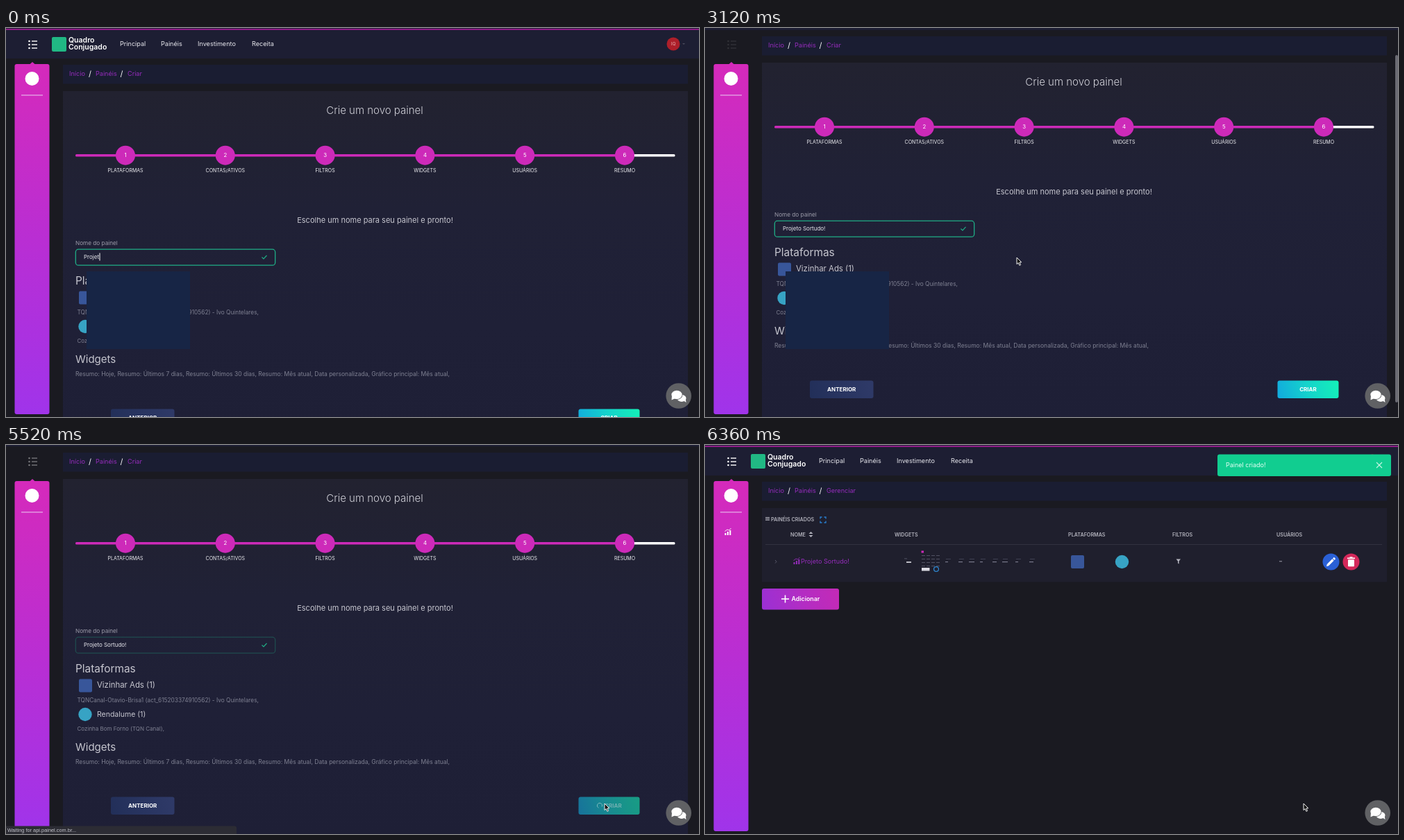
Recreate the animation shown at these times as an HTML page with a canvas. Size 998 by 561 pixels, loop 6400 ms.

```html
<!DOCTYPE html>
<html lang="pt">
<head>
<meta charset="utf-8">
<style>
html, body { margin: 0; width: 100%; height: 100%; overflow: hidden; background: #1a1a21 }
canvas { display: block }
</style>
</head>
<body>
<canvas id="stage" width="998" height="561"></canvas>
<script>
const g = document.getElementById('stage').getContext('2d');
const LOOP = 6400;
const PINK = '#cd2ab9', PURPLE = '#962cbc', PALE = '#c6c6cf', GREY = '#7f8092';
const NAME = 'Projeto Sortudo!';

const clamp = v => Math.max(0, Math.min(1, v));
const ramp = (t, a, b) => clamp((t - a) / (b - a));
const mix = (a, b, k) => a + (b - a) * k;
const smooth = k => k * k * (3 - 2 * k);

function text(s, x, y, size, color = '#fff', weight = 400, align = 'left', family = 'Inter, sans-serif') {
  g.font = `${weight} ${size}px ${family}`;
  g.textAlign = align;
  g.fillStyle = color;
  g.fillText(s, x, y + size * .35);
}

function box(x, y, w, h, color, r = 0) {
  g.beginPath();
  g.roundRect(x, y, w, h, r);
  g.fillStyle = color;
  g.fill();
}

function disc(x, y, r, color) {
  g.beginPath();
  g.arc(x, y, r, 0, 7);
  g.fillStyle = color;
  g.fill();
}

// points: x0, y0, x1, y1, ...
function trace(points) {
  g.beginPath();
  for (let i = 0; i < points.length; i += 2) g.lineTo(points[i], points[i + 1]);
}

function line(points, color, width = 1) {
  trace(points);
  g.strokeStyle = color;
  g.lineWidth = width;
  g.stroke();
}

function shape(points, color) {
  trace(points);
  g.closePath();
  g.fillStyle = color;
  g.fill();
}

function blend(x0, y0, x1, y1, ...colors) {
  const b = g.createLinearGradient(x0, y0, x1, y1);
  colors.forEach((c, i) => b.addColorStop(i / (colors.length - 1), c));
  return b;
}

function faded(alpha, draw) {
  if (alpha <= 0) return;
  g.save();
  g.globalAlpha *= alpha;
  draw();
  g.restore();
}

function chart(x, y, color) {
  [3, 5, 7].forEach((h, i) => box(x + i * 3.4, y - h, 2, h, color));
  line([x, y - 5.5, x + 3.5, y - 8, x + 6, y - 7, x + 9, y - 10], color, .9);
}

function header() {
  box(0, 0, 998, 44, '#1d1e33');
  box(0, 1, 998, 2, '#8f1c86');
  box(66, 13, 21, 21, '#21b884', 2);
  text('Quadro', 90, 17, 10.5, '#fff', 600);
  text('Conjugado', 90, 27, 10.5, '#fff', 600);
  [['Principal', 164], ['Painéis', 223], ['Investimento', 276], ['Receita', 354]]
    .forEach(([s, x]) => text(s, x, 23, 9.1, '#e8e8ee'));
  disc(961, 23, 9.5, '#ad1f2a');
  text('IQ', 961, 23, 6.5, '#e5a8aa', 400, 'center');
  shape([974, 22, 978, 22, 976, 24], '#4a4a5c');
}

function menuIcon() {
  for (let y = 19; y < 30; y += 5) {
    disc(33.5, y, 1.3, '#fff');
    box(37, y - .7, 8, 1.4, '#fff');
  }
}

function breadcrumbs(last) {
  box(82, 53, 900, 27.5, '#1a1d32');
  text('Início', 91, 66, 9.1, PURPLE);
  text('/', 119, 66, 11);
  text('Painéis', 129, 66, 9.1, PURPLE);
  text('/', 164.5, 66, 11);
  text(last, 175, 66, 9.1, PURPLE);
}

function sidebar(withChart) {
  shape([33.5, 53, 38, 49, 42.5, 53], '#d22abb');
  box(12.5, 52, 50, 505, blend(0, 52, 0, 557, '#d52abb', '#b92ed3', '#a034ea'), 3);
  disc(37.5, 73, 10, '#fff');
  box(22, 96.3, 31, 1.2, '#e6b3ea');
  if (withChart) chart(28.5, 130, '#fff');
}

function steps() {
  box(100, 182, 791, 3.6, PINK, 1.5);
  box(891, 182, 72.5, 3.6, '#fff', 1.5);
  ['PLATAFORMAS', 'CONTAS/ATIVOS', 'FILTROS', 'WIDGETS', 'USUÁRIOS', 'RESUMO'].forEach((s, i) => {
    const x = 172 + i * 143.8;
    disc(x, 183.7, 14, PINK);
    text(i + 1, x, 183.7, 7.8, '#fff', 400, 'center');
    text(s, x, 206, 7, '#f0f0f4', 400, 'center');
  });
}

function nameField(t) {
  text('Nome do painel', 100, 310, 8.2, '#9c9caa');
  faded(mix(1, .3, ramp(t, 4480, 4840)), () => {
    g.beginPath();
    g.roundRect(100.3, 319.2, 287.4, 23, 4);
    g.strokeStyle = '#1fae86';
    g.lineWidth = 1.3;
    g.stroke();
  });
  const count = t < 400 ? 6 : t < 1200 ? 7 : Math.min(16, 8 + Math.floor((t - 1200) / 80));
  const typed = NAME.slice(0, count);
  text(typed, 112, 330, 8, '#e8e8ee');
  const caret = t < 840 || (t >= 1200 && t < 2160) || (t >= 2520 && t < 2720);
  if (caret) box(112.5 + g.measureText(typed).width, 324.5, 1, 11, '#fff');
  line([368.5, 330.5, 371, 333, 375.5, 328], '#1fae86', 1.2);
}

function createButton(t) {
  const busy = t >= 4360;
  faded(busy ? .6 : 1, () => {
    box(824.5, 549.5, 88, 25.5, blend(824, 575, 912, 550, '#12a9de', '#14d3cb', '#14f0b8'), 3);
    text('CRIAR', busy ? 874.5 : 868.5, 562, 8, busy ? '#a8c4c8' : '#fff', 700, 'center');
    if (!busy) return;
    const a = t / 120;
    g.beginPath();
    g.arc(855, 562, 3.6, a, a + 4.7);
    g.strokeStyle = '#c4dcdc';
    g.lineWidth = 1;
    g.stroke();
  });
}

function formPage(t) {
  const scroll = t < 3000 ? 0 : 42 * (1 - Math.exp((2970 - t) / 40));
  g.save();
  g.translate(0, -scroll);
  box(82, 91, 900, 512, blend(0, 91, 0, 603, '#222230', '#202136', '#1f2037', '#1e1f36'));
  breadcrumbs('Criar');
  text('Crie um novo painel', 531, 119, 15, '#d0d0d8', 300, 'center');
  steps();
  text('Escolhe um nome para seu painel e pronto!', 531.5, 277, 11, PALE, 400, 'center');
  nameField(t);
  text('Plataformas', 100, 365, 15.4, PALE);
  box(105, 379.5, 19, 19, '#38569a', 2);
  text('Vizinhar Ads (1)', 131, 388, 11.4, PALE);
  text('TQNCanal-Otavio-Brisa1 (act_615203374910562) - Ivo Quintelares,', 102.5, 410, 8.3, GREY);
  disc(114, 430.5, 9.7, '#37a3c4');
  text('Rendalume (1)', 131, 430, 10.5, PALE);
  text('Cozinha Bom Forno (TQN Canal),', 102.5, 451, 8, GREY);
  text('Widgets', 100, 478, 15, PALE);
  text('Resumo: Hoje, Resumo: Últimos 7 dias, Resumo: Últimos 30 dias, Resumo: Mês atual, ' +
    'Data personalizada, Gráfico principal: Mês atual,', 100, 499, 8.5, GREY);
  box(151, 549.5, 91.5, 25.5, blend(151, 575, 242, 550, '#222f59', '#2f3a68'), 3);
  text('ANTERIOR', 196.7, 562, 8, '#fff', 700, 'center');
  createButton(t);
  header();
  g.restore();

  faded(1 - ramp(t, 5040, 5440), () => box(116, 351, 149, 112, '#172545'));
  faded(t < 3000 ? 1 : t < 3120 ? mix(1, .1, ramp(t, 3000, 3120)) : mix(.1, .4, ramp(t, 3120, 3500)), menuIcon);
  sidebar(false);
  if (t >= 3000) faded(1 - ramp(t, 3360, 3640), () => box(994, scroll * .95, 4, 501, '#6b6b73', 2));
}

function thumbnail() {
  box(311.5, 152.5, 3.5, 3, PINK);
  for (let y = 159; y < 175; y += 5) {
    for (let x = 312; x < 337; x += 7) box(x, y, 5, .8, '#5d5e70');
  }
  box(312, 177, 11.5, 4.5, '#dcdce4');
  g.beginPath();
  g.arc(333, 179, 3.4, 0, 7);
  g.strokeStyle = '#2f86cf';
  g.lineWidth = 1.3;
  g.stroke();
  box(290, 168.2, 7, 1.6, '#e4e4ea');
  box(287, 163.5, 4, .8, '#5d5e70');
  [346, 365, 380, 396, 414, 428, 447, 467].forEach((x, i) => {
    box(x, 168, 4 + i % 3 * 2, 1.2, '#77788a');
    box(x + 1, 164.3, 7, .7, '#4d4e60');
  });
}

function listCard() {
  const head = '#b2b2bc';
  box(82, 91, 900, 106.5, '#1f1f2d');
  for (let y = 104; y < 109; y += 1.9) box(87, y, 6, 1, head);
  text('PAINÉIS CRIADOS', 95, 107, 7.2, head, 600);
  for (const sx of [-1, 1]) for (const sy of [-1, 1]) {
    line([170 + sx * 4, 108 + sy * 1.5, 170 + sx * 4, 108 + sy * 4, 170 + sx * 1.5, 108 + sy * 4], '#2a7fd0', 1.3);
  }
  [['NOME', 123], ['WIDGETS', 273], ['PLATAFORMAS', 523], ['FILTROS', 673], ['USUÁRIOS', 823]]
    .forEach(([s, x]) => text(s, x, 129, 7.2, head, 600));
  shape([149.5, 128, 155.5, 128, 152.5, 125], head);
  shape([149.5, 130, 155.5, 130, 152.5, 133], head);
  box(87, 143, 888, 1, '#32323f');

  line([101, 166, 103, 168.3, 101, 170.5], '#5a5a6c');
  chart(127.5, 172, PURPLE);
  text(NAME, 138, 168, 9.1, PURPLE);
  thumbnail();
  box(527, 159, 19, 19, '#38569a', 2);
  disc(600.5, 168.5, 9.7, '#37a3c4');
  shape([678.5, 164.5, 685, 164.5, 682.5, 167.5, 682.5, 171.5, 681, 170.5, 681, 167.5], '#b8b8c2');
  box(827, 167.3, 4, 1, '#a0a0ac');

  disc(901.5, 168.5, 12, '#2a60d6');
  line([897.5, 172.5, 904.5, 165.5], '#fff', 3.2);
  line([905.2, 164.8, 907, 163], '#fff', 3.2);
  shape([895, 175, 896, 171, 899, 174], '#fff');
  disc(930.5, 168.5, 12, '#d4285a');
  box(925, 162.5, 11, 1.7, '#fff');
  box(928.5, 161.3, 4, 1.5, '#fff');
  box(926, 165.2, 9, 10, '#fff', 1);

  box(82, 207, 111, 30.5, blend(82, 237, 193, 207, '#9a30d4', '#b22dc4', '#c42ab6'), 3);
  line([110, 222, 121, 222], '#fff', 1.6);
  line([115.5, 216.5, 115.5, 227.5], '#fff', 1.6);
  text('Adicionar', 124.5, 222, 8.8, '#fff', 600);
}

function toast() {
  box(738, 13.5, 250, 31.5, '#11cd90', 3);
  text('Painel criado!', 750, 29, 9, '#e6fff5');
  line([967, 25, 975, 33], '#c8f5e4', 1.1);
  line([975, 25, 967, 33], '#c8f5e4', 1.1);
}

function listPage(t) {
  header();
  menuIcon();
  breadcrumbs('Gerenciar');
  sidebar(true);
  faded(mix(.1, 1, ramp(t, 5720, 6240)), listCard);
  faded(ramp(t, 5720, 6020), toast);
}

function chatButton() {
  disc(968.7, 530.5, 18.3, '#606164');
  g.fillStyle = '#fff';
  g.beginPath();
  g.ellipse(973, 534, 6.5, 5, 0, 0, 7);
  g.fill();
  shape([975, 537, 979.5, 540, 978.5, 534], '#fff');
  g.beginPath();
  g.ellipse(966, 529, 7.6, 6.2, 0, 0, 7);
  g.strokeStyle = '#606164';
  g.lineWidth = 1.6;
  g.stroke();
  g.fillStyle = '#fff';
  g.fill();
  shape([959, 530, 958.5, 536.5, 964, 534], '#fff');
}

function statusBar() {
  box(0, 549.5, 332, 12, '#2c2c34', [0, 3, 0, 0]);
  text('Waiting for api.painel.com.br...', 2, 555.5, 7.4, '#c4c4cc', 400, 'left', 'Liberation Sans, sans-serif');
}

function pointer(t) {
  if (t < 2520) return;
  const a = ramp(t, 2480, 2760), b = smooth(ramp(t, 3640, 4080));
  const x = mix(mix(394, 449, 1 - (1 - a) ** 2), 862, b);
  const y = mix(mix(333, 331, a), 517, b);
  const p = [0, 0, 0, 9.6, 2.2, 7.6, 3.9, 11.4, 5.6, 10.6, 3.9, 7, 6.8, 6.8].map((v, i) => v + (i % 2 ? y : x));
  shape(p, '#111');
  g.strokeStyle = '#f2f2f2';
  g.lineWidth = 1;
  g.stroke();
}

function frame(now) {
  const t = now % LOOP;
  box(0, 0, 998, 561, '#1a1a21');
  if (t < 5680) formPage(t);
  else listPage(t);
  faded(ramp(t, 5080, 5240) * (1 - ramp(t, 5720, 6160)), statusBar);
  chatButton();
  pointer(t);
  requestAnimationFrame(frame);
}
requestAnimationFrame(frame);
</script>
</body>
</html>
```
